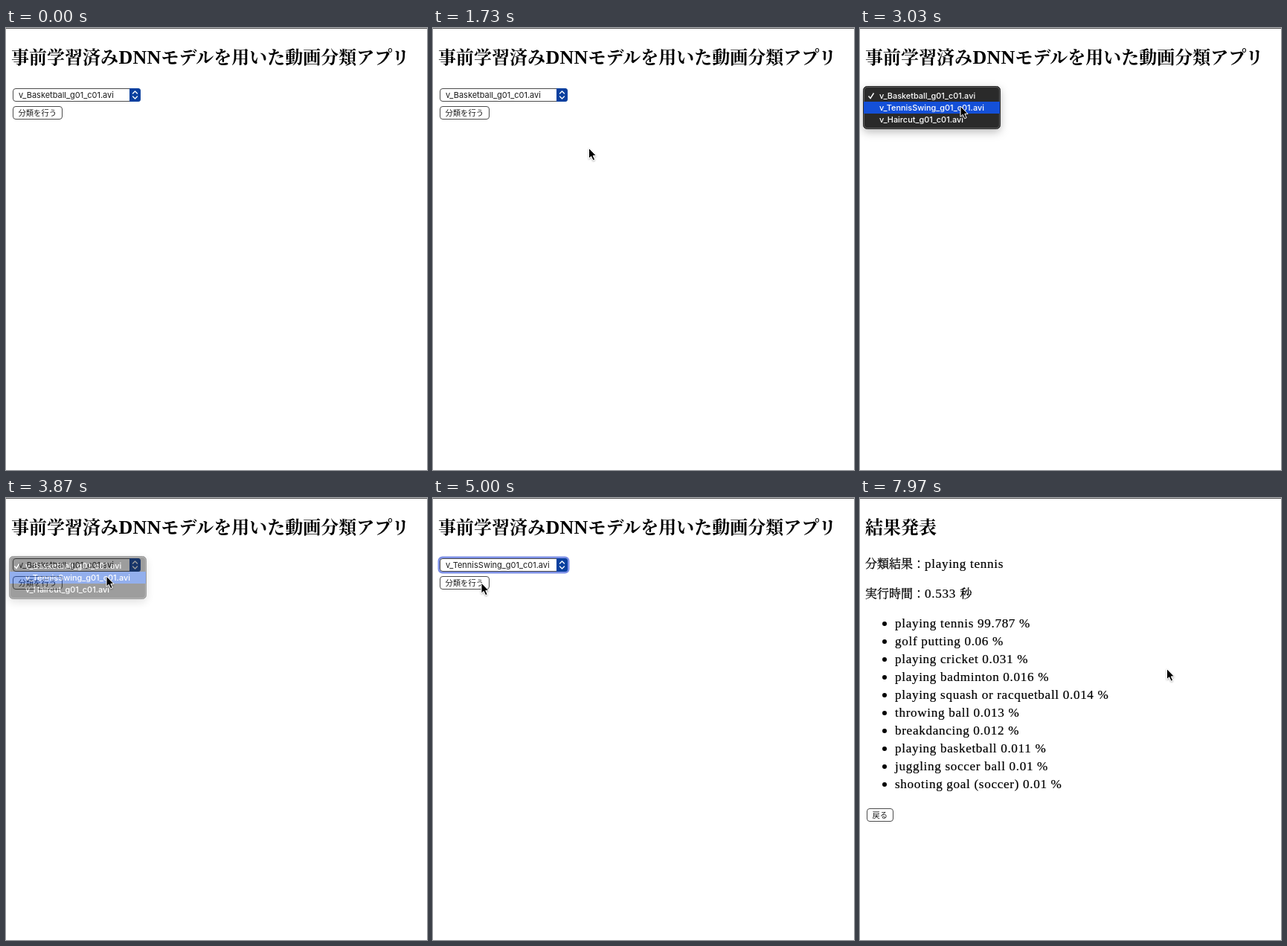
These frames come from a looping animation (566x594 px, 8 s). An HTML page:

```html
<!DOCTYPE html>
<html lang="ja">
<head>
<meta charset="utf-8">
<title>動画分類アプリ</title>
<style>
  html, body { margin: 0; width: 100%; height: 100%; overflow: hidden; background: #fff; }
  svg { display: block; width: 100vw; height: 100vh; }
  text { white-space: pre; }
  .jp { font: 500 16px 'Noto Serif CJK JP', 'Noto Sans CJK JP', 'Noto Sans CJK', serif; }
  .jp:not(.h1) { stroke: #000; stroke-width: .3; }
  .h1 { font-size: 24px; font-weight: 700; }
  .en { font: 17.2px 'Liberation Serif', serif; letter-spacing: .65px; stroke: #000; stroke-width: .2; }
  .h1en { font-size: 26px; font-weight: 700; letter-spacing: .2px; stroke: none; }
  .ui { font: 11px Inter, sans-serif; fill: #1c1c1c; }
  .item { font-size: 10.9px; font-weight: 500; fill: #fff; }
  .label { font: 500 10.3px 'Noto Sans CJK JP', 'Noto Sans CJK', sans-serif; fill: #1c1c1c; }
  .box { fill: #fff; stroke: #4c4c4c; stroke-width: 1; }
</style>
</head>
<body>
<svg viewBox="0 0 566 594" xmlns="http://www.w3.org/2000/svg">
  <defs>
    <filter id="soft" x="-20%" y="-40%" width="140%" height="200%">
      <feDropShadow dx="0" dy="4" stdDeviation="6" flood-color="#000" flood-opacity=".26"/>
    </filter>
    <filter id="drop" x="-50%" y="-50%" width="200%" height="200%">
      <feDropShadow dx="0" dy="1" stdDeviation=".8" flood-color="#000" flood-opacity=".35"/>
    </filter>
  </defs>
  <rect width="566" height="594" fill="#fff"/>
  <rect width="566" height="1" fill="#555"/>

  <g id="form">
    <text class="jp h1" x="7" y="48">事前学習済み</text>
    <text class="en h1en" x="151.5" y="48">DNN</text>
    <text class="jp h1" x="208.5" y="48">モデルを用いた動画分類アプリ</text>
    <rect id="ring" fill="none" stroke="#7d90e6" stroke-width="3"/>
    <rect class="box" x="9.5" y="81.5" width="171" height="17" rx="3.5"/>
    <path d="M166 81H177.5Q181 81 181 84.5V95.5Q181 99 177.5 99H166Z" fill="#0a409f"/>
    <path d="M170.5 88L173.5 85L176.5 88M170.5 92L173.5 95L176.5 92" fill="none"
      stroke="#fff" stroke-width="1.3" stroke-linecap="round" stroke-linejoin="round"/>
    <text id="value" class="ui" x="17" y="94"></text>
    <rect id="run" class="box" x="9.5" y="105.5" width="66" height="17" rx="3.5"/>
    <text class="label" x="16.5" y="118">分類を行う</text>
  </g>

  <g id="menu">
    <rect x="4.5" y="78.5" width="184" height="57" rx="5" fill="#2b2b2b" stroke="#2b2b2b" filter="url(#soft)"/>
    <rect x="5.5" y="79.5" width="182" height="55" rx="4.5" fill="none" stroke="#5c5c5c"/>
    <rect id="mark" x="5" width="183" height="16" fill="#1450d8"/>
    <path d="M11.5 91.5L14 94.5L18.5 87.5" fill="none" stroke="#fff" stroke-width="1.4"/>
    <g id="items"></g>
  </g>

  <g id="result">
    <text class="jp h1" x="7" y="48">結果発表</text>
    <text class="jp" x="7" y="94">分類結果：</text>
    <text class="en" x="87" y="94">playing tennis</text>
    <text class="jp" x="7" y="134">実行時間：</text>
    <text class="en" x="87" y="134">0.533</text>
    <text class="jp" x="134.5" y="134">秒</text>
    <g id="scores"></g>
    <rect class="box" x="9.5" y="417.5" width="35" height="17" rx="3.5"/>
    <text class="label" x="16.5" y="430">戻る</text>
  </g>

  <path id="cursor" d="M0 0V14.2L3.2 11.3L5.7 16.7L8.2 15.6L5.8 10.4H10Z"
    fill="#000" stroke="#fff" stroke-width="1" stroke-linejoin="round" filter="url(#drop)"/>
</svg>

<script>
const LOOP = 8000;
const $ = id => document.getElementById(id);
const files = ['Basketball', 'TennisSwing', 'Haircut'].map(n => `v_${n}_g01_c01.avi`);
const scores = [
  'playing tennis 99.787', 'golf putting 0.06', 'playing cricket 0.031',
  'playing badminton 0.016', 'playing squash or racquetball 0.014',
  'throwing ball 0.013', 'breakdancing 0.012', 'playing basketball 0.011',
  'juggling soccer ball 0.01', 'shooting goal (soccer) 0.01'
];

$('items').innerHTML = files.map((f, i) =>
  `<text class="ui item" x="26" y="${95 + 16 * i}">${f}</text>`).join('');
$('scores').innerHTML = scores.map((s, i) =>
  `<circle cx="33" cy="${169 + 24 * i}" r="3"/>` +
  `<text class="en" x="47" y="${173.5 + 24 * i}">${s} %</text>`).join('');

const clamp = v => Math.max(0, Math.min(1, v));
const part = (t, a, b) => clamp((t - a) / (b - a));
const easeOut = p => 1 - (1 - p) ** 2;
const easeInOut = p => p * p * (3 - 2 * p);
const linear = p => p;

// Pointer moves: start, end, x, y, easing
const moves = [
  [1260, 2070, 135, 94, easeOut],
  [2150, 2230, 135, 88, linear],
  [2650, 3030, 135, 105, easeInOut],
  [4410, 4800, 72, 118, easeInOut],
  [4800, 5000, 65, 114, easeOut],
  [5000, 5230, 63, 114, easeOut],
  [6140, 6300, 261.5, 143, easeInOut],
  [7800, 7970, 412.5, 229.5, easeInOut]
];

function pointer(t) {
  let x = 560, y = 478;
  for (const [a, b, tx, ty, ease] of moves) {
    const p = ease(part(t, a, b));
    x += (tx - x) * p;
    y += (ty - y) * p;
  }
  return [x, y];
}

function show(el, on) {
  el.style.display = on ? '' : 'none';
}

function setRing(t) {
  const grow = 2 * (1 - easeOut(part(t, 4050, 4300)));
  const ring = $('ring');
  ring.setAttribute('x', 8 - grow);
  ring.setAttribute('y', 80 - grow);
  ring.setAttribute('width', 174 + 2 * grow);
  ring.setAttribute('height', 20 + 2 * grow);
  ring.setAttribute('rx', 4.5 + grow);
  ring.setAttribute('opacity', part(t, 4050, 4250) * (1 - part(t, 5270, 5400)));
}

function draw(t) {
  const [x, y] = pointer(t);
  const done = t >= 6730;
  $('cursor').setAttribute('transform', `translate(${x} ${y})`);
  show($('cursor'), t >= 1270);
  show($('form'), !done);
  show($('result'), done);

  $('value').textContent = files[t < 4050 ? 0 : 1];
  $('run').style.fill = t >= 5270 && t < 5400 ? '#e2e2e2' : '#fff';
  setRing(t);

  show($('menu'), t >= 2400 && t < 4050);
  $('menu').setAttribute('opacity', 1 - part(t, 3740, 3980));
  $('mark').setAttribute('y', y < 97 ? 83 : 99);
  $('mark').setAttribute('opacity', t >= 3600 && t < 3670 ? 0 : 1);
}

function tick() {
  draw(performance.now() % LOOP);
  requestAnimationFrame(tick);
}
tick();
</script>
</body>
</html>
```
